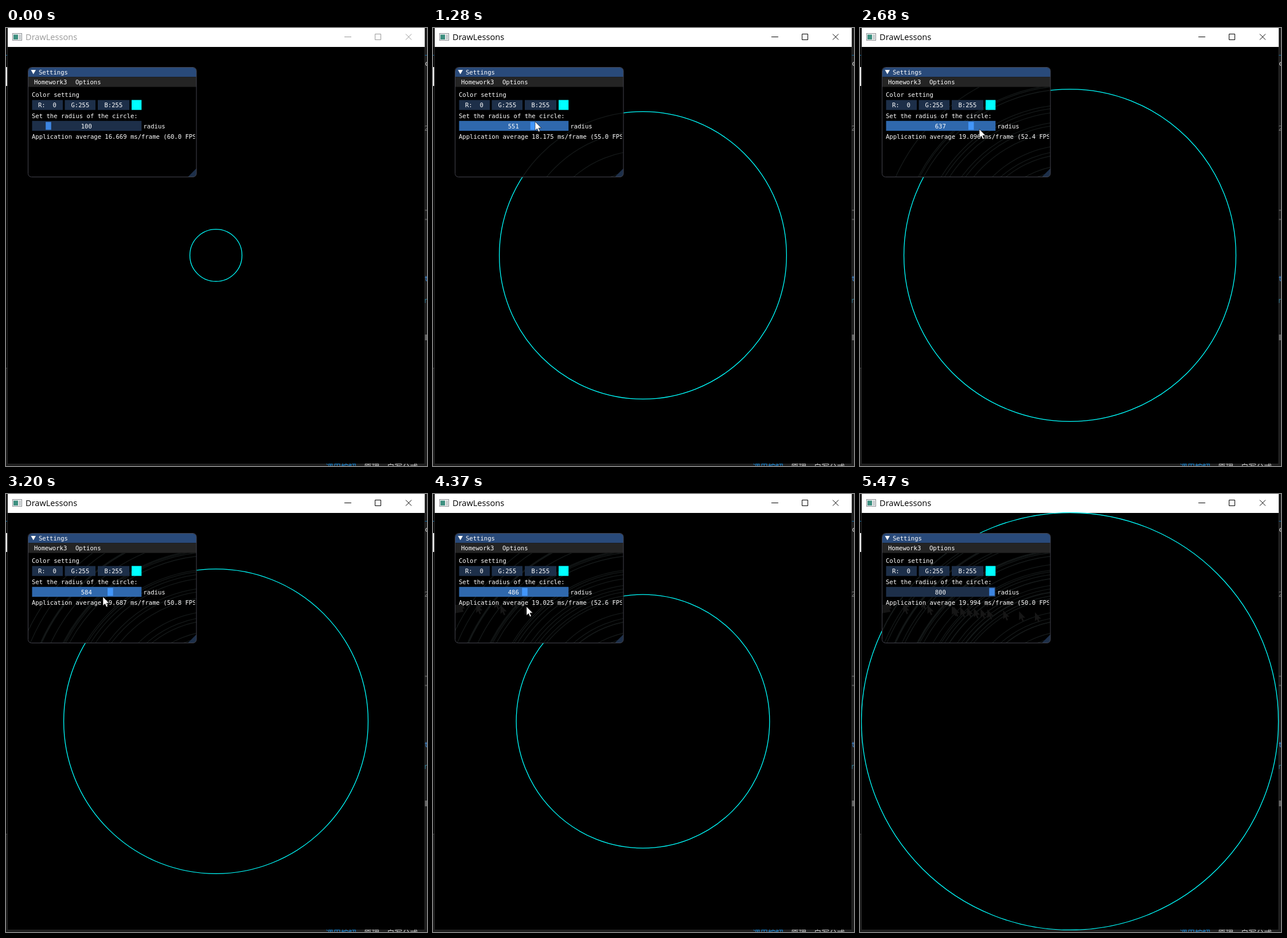
Animation, 734 px wide and 763 px high, one loop 5550 ms. Source, as an HTML page:

```html
<!DOCTYPE html>
<html lang="en">
<head>
<meta charset="utf-8">
<style>
  html, body { margin: 0; width: 100%; height: 100%; overflow: hidden; background: #1e1e1e; }
  svg { display: block; width: 734px; height: 763px; }
  text { white-space: pre; }
  .mono { font: 10.58px "DejaVu Sans Mono", monospace; fill: #fff; }
  .edge { font: 13px "DejaVu Sans Mono", monospace; }
  .cjk { font: 13.5px "Noto Sans CJK SC", "Noto Sans CJK", sans-serif; }
  .title { font: 14.6px "Open Sans", sans-serif; }
</style>
</head>
<body>
<svg viewBox="0 0 734 763">
  <defs>
    <path id="arrow" d="M0 0V15.5L3.6 12.2 6 17.8 8.4 16.7 6 11.2H10.8Z"/>
    <clipPath id="body"><rect x="39" y="103" width="293" height="156"/></clipPath>
    <clipPath id="under"><rect x="39" y="193" width="293" height="66"/></clipPath>
    <clipPath id="line"><rect x="39" y="180" width="290.5" height="20"/></clipPath>
    <clipPath id="bottom"><rect y="758.5" width="734" height="5"/></clipPath>
    <clipPath id="canvas"><rect x="2" y="32" width="729" height="728"/></clipPath>
  </defs>

  <!-- desktop edges -->
  <rect width="734" height="763" fill="#1e1e1e"/>
  <rect y="33" width="3" height="559" fill="#080808"/>
  <rect y="592" width="3" height="1" fill="#444"/>
  <rect y="68" width="3" height="33" fill="#eee"/>
  <path d="M0 47.5H3M730 47.5H734" stroke="#0a6aa8"/>
  <path d="M730 317.5H734M730 333.5H734" stroke="#555" stroke-width="2"/>
  <rect x="730" y="534" width="4" height="10" fill="#686868"/>
  <g class="edge">
    <text x="730" y="66" fill="#ddd">c</text>
    <text x="729" y="179" fill="#777">2</text>
    <text x="729" y="441" fill="#3f8fe0">t</text>
    <text x="729" y="479" fill="#2f8fb0">n</text>
  </g>

  <!-- application window -->
  <rect x="2.5" width="727.5" height="759.5" fill="#000"/>
  <path d="M2.5 33V759.5H730V33" fill="none" stroke="#2b2b2b"/>
  <rect x="3" width="727" height="33" fill="#fff"/>
  <rect x="11.5" y="9.5" width="16" height="12" fill="#f4f4f4" stroke="#8a8f94"/>
  <rect x="13" y="11.5" width="8" height="8.5" fill="#3d8f80"/>
  <rect x="22.5" y="11.5" width="3.5" height="8.5" fill="#c4c9cc"/>
  <g id="chrome">
    <text class="title" x="34" y="21" fill="currentColor">DrawLessons</text>
    <path d="M590 15.5H602M643.5 10.5H653.5V20.5H643.5ZM697 10.5L707 20.5M707 10.5L697 20.5" fill="none" stroke="currentColor"/>
  </g>
  <g class="cjk" clip-path="url(#bottom)">
    <text x="557" y="770" fill="#1c8fe0">调用按钮</text>
    <text x="624" y="770" fill="#ccc">原理</text>
    <text x="664" y="770" fill="#ccc">自写公式</text>
  </g>
  <g clip-path="url(#canvas)">
    <circle id="ring" cx="366" cy="396" fill="none" stroke="#0ff" stroke-width="1.3"/>
  </g>

  <!-- settings panel -->
  <rect x="38.5" y="68.5" width="293.5" height="191" rx="6" fill="#000"/>
  <g id="arcs" clip-path="url(#body)" fill="none" stroke="#151919" stroke-width="1.3"></g>
  <g id="trail" clip-path="url(#under)" fill="#161616"></g>
  <path d="M39 85.3V75A6 6 0 0 1 45 69H326A6 6 0 0 1 332 75V85.3Z" fill="#294a7a"/>
  <rect x="39" y="85.3" width="293" height="17.3" fill="#242424"/>
  <path d="M317 259.5L332 244.5V253.5A6 6 0 0 1 326 259.5Z" fill="#1d2f49"/>
  <rect x="38.5" y="68.5" width="293.5" height="191" rx="6" fill="none" stroke="#43434c"/>
  <path d="M43.5 73H52L47.75 80.5Z" fill="#fff"/>
  <path d="M45.5 125.4H99V142.7H45.5ZM102.5 125.4H156V142.7H102.5ZM160 125.4H215V142.7H160Z" fill="#1d2f49"/>
  <rect x="219" y="125.4" width="17.3" height="17.3" fill="#0ff"/>
  <rect id="slider" x="45.5" y="161.8" width="190.8" height="17.3"/>
  <rect id="grab" y="163.6" width="9.6" height="13.7"/>
  <g class="mono">
    <text x="57" y="81">Settings</text>
    <text x="49" y="98">Homework3</text>
    <text x="121" y="98">Options</text>
    <text x="45" y="120">Color setting</text>
    <text x="56" y="138">R:  0</text>
    <text x="113.5" y="138">G:255</text>
    <text x="171.5" y="138">B:255</text>
    <text x="45" y="156.5">Set the radius of the circle:</text>
    <text id="value" x="140.3" y="174.5" text-anchor="middle"></text>
    <text x="239.5" y="174.5">radius</text>
    <text id="stats" x="45" y="193" clip-path="url(#line)"></text>
  </g>
  <use id="cursor" href="#arrow" fill="#fff" stroke="#000" stroke-width=".6"/>
</svg>
<script>
const $ = id => document.getElementById(id);
const LOOP = 5550;
const ENTER = 1, PRESS = 11, RELEASE = 70, LEAVE = 72;

const clock = [[0, 0], [60, 1], [1200, 17], [5470, 75], [LOOP, 76]];

// Main points of the pointer path: step, x, y.
const path = [
  [1, 600, 671], [8, 183, 147], [11, 74, 170],
  [17, 174.5, 164], [18, 178, 163], [20, 215, 166],
  [28, 77.1, 176], [31, 55, 176],
  [36, 193.7, 176], [37, 208, 176], [40, 232, 178],
  [43, 181.9, 179], [44, 169, 179], [48, 45, 188], [56, 33, 190],
  [59, 160, 195], [60, 163, 196], [65, 222, 201],
  [68, 305, 206], [71, 460, 750]
];

// Average ms per frame by step.
const frameCost = [
  [0, 16.669], [18, 18.175], [29, 19.439], [37, 19.096], [44, 19.687], [60, 19.025], [75, 19.994]
];

function along(keys, at, column = 1) {
  const i = Math.max(1, keys.findIndex(key => key[0] >= at));
  const from = keys[i - 1], to = keys[i];
  const part = (at - from[0]) / (to[0] - from[0]);
  return from[column] + (to[column] - from[column]) * part;
}

const pointer = step => [along(path, step, 1), along(path, step, 2)];

// The slider follows the pointer one step late.
function radiusAt(step) {
  if (step <= PRESS) return 100;
  if (step >= RELEASE) return 800;
  const value = Math.round((pointer(step - 1)[0] - 51.7) / 0.2229);
  return Math.min(800, Math.max(0, value));
}
const pixels = value => value * 0.4544;

// Faint traces of earlier steps stay behind in the panel.
function drawTraces(step) {
  let arcs = "", trail = "";
  for (let s = PRESS + 1; s <= step; s++) {
    arcs += `<circle cx="366" cy="396" r="${pixels(radiusAt(s))}"/>`;
    if (s < step && s < RELEASE) {
      trail += `<use href="#arrow" transform="translate(${pointer(s)})"/>`;
    }
  }
  $("arcs").innerHTML = arcs;
  $("trail").innerHTML = trail;
}

function draw(step) {
  const value = radiusAt(step);
  const active = step >= PRESS && step < RELEASE;
  const cost = along(frameCost, step);
  const shown = step >= ENTER && step < LEAVE;

  drawTraces(step);
  $("ring").setAttribute("r", pixels(value));
  $("chrome").setAttribute("color", step < PRESS ? "#999" : "#000");
  $("slider").setAttribute("fill", active ? "#2f68ad" : "#1d2f49");
  $("grab").setAttribute("fill", active ? "#4296fa" : "#3d85e0");
  $("grab").setAttribute("x", 46.9 + value * 0.2229);
  $("value").textContent = value;
  $("stats").textContent =
    `Application average ${cost.toFixed(3)} ms/frame (${(1000 / cost).toFixed(1)} FPS)`;
  $("cursor").setAttribute("visibility", shown ? "visible" : "hidden");
  if (shown) $("cursor").setAttribute("transform", `translate(${pointer(step)})`);
}

let current = -1;
const origin = performance.now();
function tick() {
  const time = (performance.now() - origin) % LOOP;
  const step = Math.floor(along(clock, time));
  if (step !== current) draw(current = step);
  requestAnimationFrame(tick);
}
tick();
</script>
</body>
</html>
```
